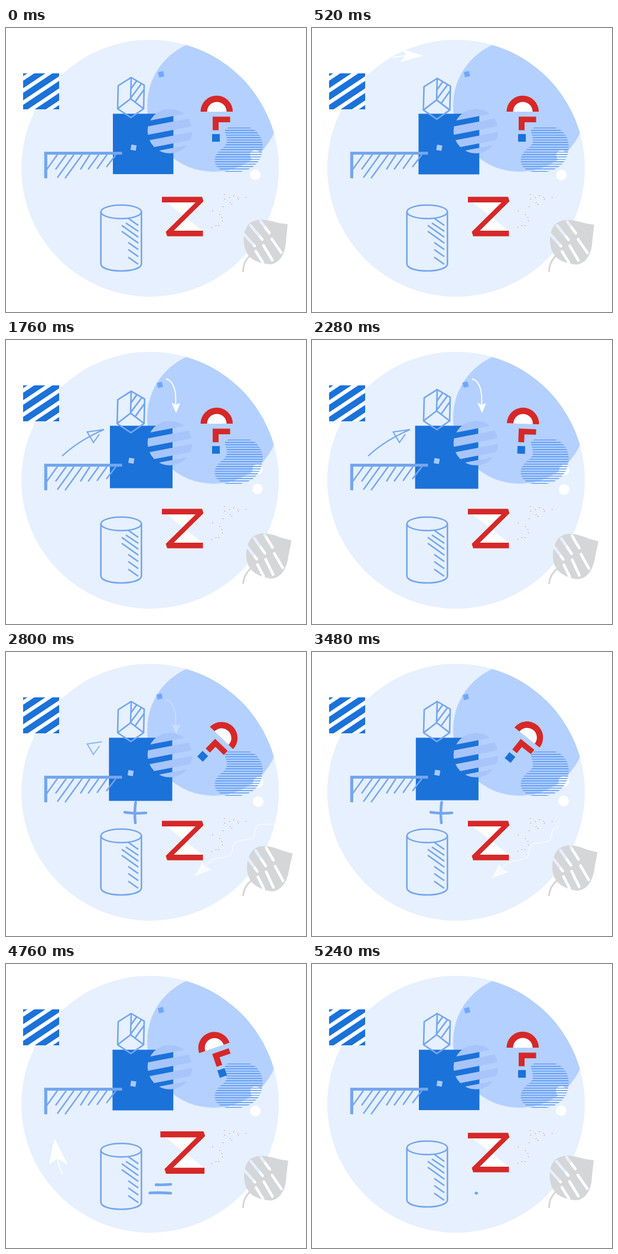
Recreate the animation shown at these times as an HTML page. Size 508 by 482 pixels, loop 5.28 s.

```html
<!DOCTYPE html>
<html lang="en">
<head>
<meta charset="utf-8">
<title>Geometric shapes</title>
<style>
html, body { margin: 0; width: 100%; height: 100%; overflow: hidden; background: #fff; }
svg { display: block; width: 508px; height: 482px; }
.line { fill: none; stroke: #74a6ee; }
.white { fill: none; stroke: #fff; }
.pen { stroke-linecap: round; stroke-width: 4.6; }
</style>
</head>
<body>
<svg viewBox="0 0 508 482">
  <defs>
    <clipPath id="disc"><circle cx="244" cy="238" r="218"/></clipPath>
    <clipPath id="tile"><path d="M29 77h61v61h-61z"/></clipPath>
    <clipPath id="ball"><circle cx="277.5" cy="175" r="37.8"/></clipPath>
    <clipPath id="blob"><path d="M371 172C380 165 405 166 415 170C431 177 437 193 434 209C430 233 410 245 385 245C365 245 351 236 354 221C357 206 373 204 374 192C374 182 370 178 371 172Z"/></clipPath>
    <mask id="cuts" maskUnits="userSpaceOnUse" x="390" y="310" width="110" height="110">
      <path fill="#fff" d="M390 310h110v110h-110z"/>
      <path stroke="#000" stroke-width="4.6" stroke-linecap="round" d="M403 350L421 370M414 335L434 359M431 328L446 348M423 379L435 398M436 369L451 394M450 358L466 381"/>
    </mask>
  </defs>

  <circle cx="244" cy="238" r="218" fill="#e6f0ff"/>
  <circle cx="351.5" cy="131.5" r="112.5" fill="#b4d0ff" clip-path="url(#disc)"/>

  <g clip-path="url(#tile)">
    <path fill="#1b72d9" d="M29 77h61v61h-61z"/>
    <path id="tileGaps" class="white" stroke-width="6.5"/>
  </g>

  <rect id="square" y="145.5" fill="#1b72d9"/>
  <path id="chip" fill="#a8c8ff" d="M-4.5-4.5h9v9h-9z"/>
  <path id="bit" fill="#70a8fb" d="M-4.5-4.5h9v9h-9z"/>
  <g clip-path="url(#ball)">
    <path fill="#a7c5fb" transform="translate(277.5 175) rotate(-11)" d="M-40-40h80v16h-80zM-40-15h80v14h-80zM-40 8.500h80v13h-80zM-40 29h80v11h-80z"/>
  </g>

  <path class="line" stroke-width="5.2" d="M67.3 255V212.5H196.5"/>
  <path class="line" stroke-width="2.4" d="M87 215L69 240M102 215L84 240M115 215L87 254M129 215L100 255M142 215L126 240M157 215L139 240M171 215L154 239M186 215L170 236"/>
  <path id="box" class="line" stroke-width="2.6" d="M212 84L234 97L233 137L211.500 152L189 137L190 98ZL211 120L189 137M211 120L233 137M221 90L211 104M229 95L211 119M234 104L219 125"/>

  <g id="dots"><circle cx="422" cy="216" r="9" fill="#fff"/><circle cx="422" cy="249" r="9" fill="#fff"/></g>
  <path id="blobLines" class="line" style="stroke:#4f93f0" stroke-width="1.4" clip-path="url(#blob)"/>

  <g id="arch">
    <path fill="#fff" d="M340 142a17 17 0 0 1 34 0z"/>
    <path fill="#d62828" d="M329.500 142a27.250 27.250 0 0 1 54.500 0h-10.500a16.500 16.500 0 0 0-33 0zM350 150.500h29.500v9.500h-19.500v13.500h-10z"/>
    <path fill="#1b72d9" d="M349 180h13v13h-13z"/>
  </g>

  <g id="zed">
    <path fill="#fff" d="M271 295H322L284 345H334Z"/>
    <path fill="#d62828" d="M264 286.500H332L334.500 294L284 344H333.500V353.500H273L270.500 346L321 296H264Z"/>
  </g>
  <path fill="#e04a50" id="specks"/>

  <g id="can" class="line" stroke-width="2.6">
    <ellipse cx="195" cy="312" rx="34.300" ry="11.500"/>
    <path d="M160.700 312V401C163 416 227 416 229.300 401V312M207 323l17 12M203 331l21 14M196 335l28 20M196 345l28 20M207 364l17 12M207 376l17 12M207 389l17 12"/>
  </g>

  <g id="leaf">
    <path fill="#d5d6d8" mask="url(#cuts)" d="M477 333C466 332 458 330 451 328C436 324 417 323 408 337C401 348 401 366 406 378C412 392 425 399 447 401C463 400 473 384 474 362C475 351 476 343 477 333Z"/>
    <path fill="none" stroke="#d5d6d8" stroke-width="3" d="M401.500 414C401 402 405 394 413 386"/>
  </g>

  <g id="glider">
    <path fill="#fff" d="M209 47L172 35L181 46L170 58Z"/>
    <path class="white" stroke-width="1.8" d="M157 50Q168 48 181 47"/>
  </g>
  <path id="flight" class="line" stroke-width="2" pathLength="1" d="M95 197C113 180 138 164 166 152L137.500 156L148 174L158 160"/>
  <g id="bend">
    <path id="bendLine" class="white" stroke-width="1.8" pathLength="1" d="M271 66C285 69 289 90 287 113"/>
    <path id="bendTip" fill="#fff" d="M288 124L280 106L287 110L295 107Z"/>
  </g>
  <g id="wave">
    <path id="waveLine" class="white" stroke-width="1.500" pathLength="1" d="M455 292C440 294 428 288 423 299C420 308 423 316 411 318C397 321 386 318 384 332C384 346 378 346 366 349C354 350 347 352 336 365"/>
    <path id="waveTip" fill="#fff" d="M319 381L333 356L337 364L349 369Z"/>
  </g>
  <path id="plusV" class="line pen" pathLength="1" d="M219.500 255Q217 272 219 290"/>
  <path id="plusH" class="line pen" pathLength="1" d="M201 272Q219 275 237 273"/>
  <path id="drop" class="line" style="stroke:#9bbff7" stroke-width="1.8" pathLength="1" d="M138 291Q138 320 141 342Q145 327 155 320.500Q138 326 122 322.500Q136 328 141 342"/>
  <g id="riser">
    <path fill="#fff" d="M82 296L73 340L87 330L105 341Z"/>
    <path class="white" stroke-width="1.800" d="M87 329Q90 345 96 357"/>
  </g>
  <path id="equalA" class="line pen" pathLength="1" d="M243.500 374Q261 375.500 279 374"/>
  <path id="equalB" class="line pen" pathLength="1" d="M243.500 388.500Q261 387.500 279 389"/>
</svg>
<script>
const LOOP = 5280, STEP = 40;
const $ = id => document.getElementById(id);
const lines = (n, draw) => Array.from({ length: n }, (_, i) => draw(i)).join('');

$('tileGaps').setAttribute('d', lines(5, i => `M24 ${89 + i * 20.5}l71 -47.5`));
$('blobLines').setAttribute('d', lines(21, i => `M350 ${165.5 + i * 4.1}h90`));
$('specks').setAttribute('d', [
  369, 282, 370, 290, 378, 287, 385, 284, 392, 287, 393, 290, 379, 296, 382, 299, 367, 303,
  349, 310, 361, 316, 365, 321, 366, 327, 355, 335, 360, 335, 348, 338, 406, 287
].reduce((d, v, i) => d + (i % 2 ? ` ${v}h1v1h-1z` : `M${v}`), ''));

// Eased progress from a to b
const ease = (t, a, b) => {
  const p = Math.min(1, Math.max(0, (t - a) / (b - a)));
  return p * p * (3 - 2 * p);
};
const pulse = (t, a, b, c, d) => ease(t, a, b) - ease(t, c, d);
const move = (id, value) => $(id).setAttribute('transform', value);
const fade = (id, value) => { $(id).style.opacity = value; };

// Shows the part of a path between two fractions of its length
function trim(id, from, to) {
  const s = $(id).style;
  s.visibility = to - from > 0.002 ? 'visible' : 'hidden';
  s.strokeDasharray = `${Math.max(0, to - from)} 2`;
  s.strokeDashoffset = -from;
}
const draw = (id, t, a, b, c, d) => trim(id, ease(t, c, d), ease(t, a, b));

function render(t) {
  const k = Math.sin(Math.PI * t / LOOP) ** 2;
  const size = 102.5 + 4.7 * k;
  const square = $('square');
  square.setAttribute('x', 181 - 6.7 * k);
  square.setAttribute('width', size);
  square.setAttribute('height', size);
  move('chip', `translate(${216 - 5 * k} ${203 + 2.5 * k}) rotate(10)`);
  move('bit', `translate(${262.7 - 2.7 * k} ${78.5 - 3 * k}) rotate(-14)`);
  move('dots', `translate(${5.3 * k} ${5 * k})`);
  move('leaf', `rotate(${6.4 * k} 401 413)`);

  const hop = t > 100 && t < 2400 ? Math.sin(Math.PI * (t - 100) / 2300) ** 2 : 0;
  move('box', `translate(211.5 ${118 + 7 * hop}) scale(${1 + 0.06 * hop}) translate(-211.5 -118)`);

  const turn = 44 * ease(t, 2200, 2800) - 63 * ease(t, 3200, 4760) + 19 * ease(t, 4760, 5200);
  move('arch', `rotate(${turn} 356 154)`);
  const grow = 1 + 0.075 * pulse(t, 3800, 4600, 4800, 5200);
  move('zed', `translate(299 320) scale(${grow}) translate(-299 -320)`);
  move('can', `translate(0 ${4 * pulse(t, 3700, 4500, 4800, 5200)})`);

  move('glider', `translate(${-45 * (1 - ease(t, 100, 900))} 0)`);
  fade('glider', pulse(t, 100, 400, 850, 1250));
  trim('flight', 0.9 * ease(t, 2500, 3000), ease(t, 600, 1000));
  fade('flight', 1 - ease(t, 2680, 3080));

  const fall = ease(t, 2500, 2960);
  trim('bendLine', 0, ease(t, 1350, 1700));
  fade('bendTip', ease(t, 1600, 1720));
  move('bend', `translate(0 ${21 * fall})`);
  fade('bend', 1 - fall);

  const drift = ease(t, 2840, 4080);
  move('wave', `translate(${-30 * drift} ${8 * drift})`);
  trim('waveLine', 0.25 * drift, ease(t, 2300, 2760));
  fade('waveTip', ease(t, 2600, 2760));
  fade('wave', 0.75 * (1 - ease(t, 3700, 4400)));

  draw('plusV', t, 2300, 2600, 3500, 3800);
  draw('plusH', t, 2450, 2750, 3600, 3900);
  draw('drop', t, 3500, 3980, 4200, 4600);
  move('riser', `translate(0 ${40 * (1 - ease(t, 4300, 4760))})`);
  fade('riser', pulse(t, 4300, 4650, 4880, 5270));
  draw('equalA', t, 3980, 4180, 4600, 5040);
  draw('equalB', t, 4150, 4400, 4800, 5300);
}

const start = performance.now();
function tick() {
  const t = (performance.now() - start) % LOOP;
  render(Math.floor(t / STEP) * STEP);
  requestAnimationFrame(tick);
}
tick();
</script>
</body>
</html>
```
